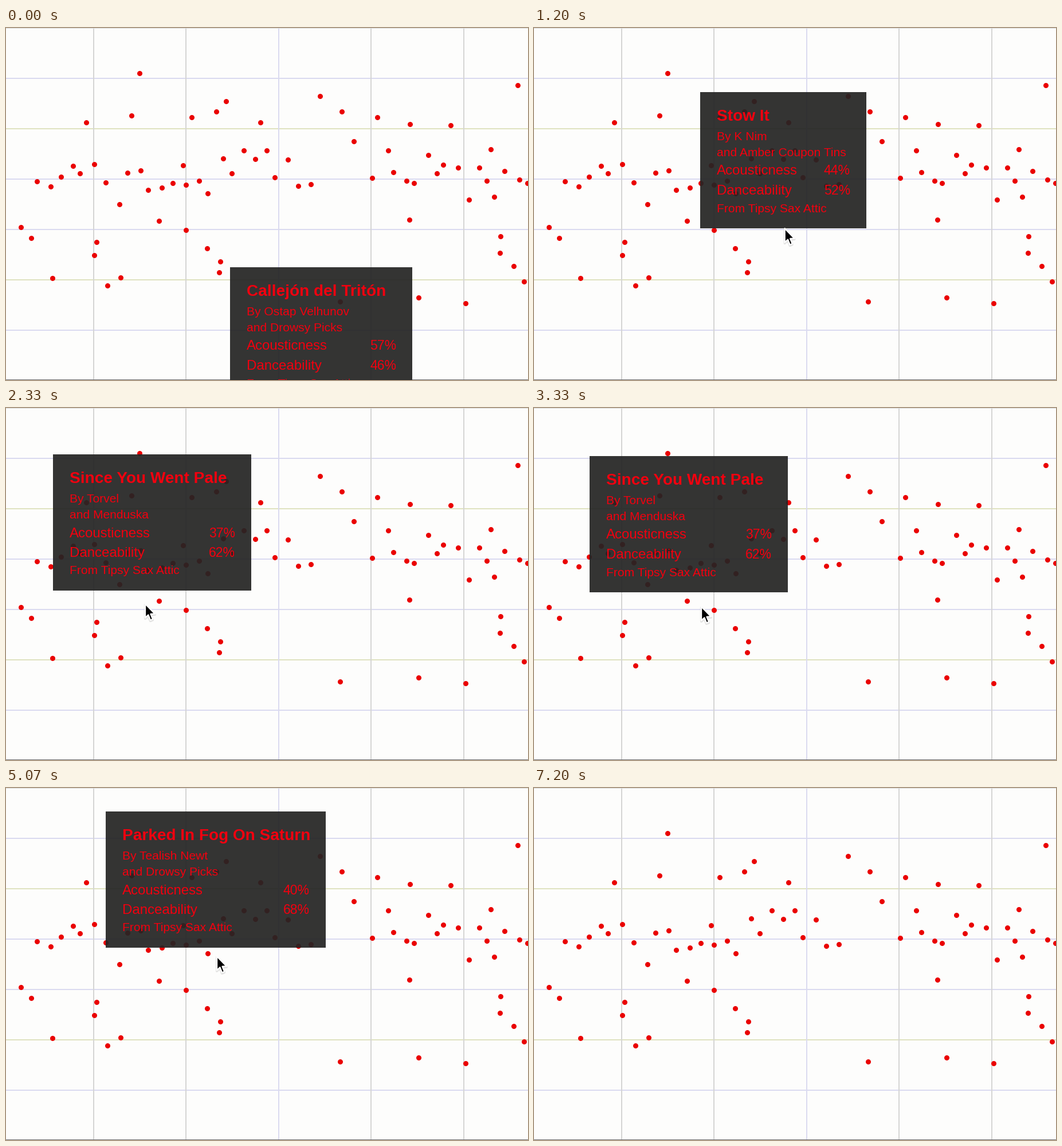
Recreate the animation shown at these times as a matplotlib script. Size 911x615 px, loop 7.59 s.

```python
import numpy as np
import matplotlib.pyplot as plt
from matplotlib.animation import FuncAnimation
from matplotlib.patches import Polygon, Rectangle

W, H, DPI = 911, 615, 72
FRAMES, INTERVAL = 253, 30
STEP = 1000 / 15          # the pointer and card move at 15 steps a second
LAST = 108
FONT = "Liberation Sans"
RED, DOT = "#f2000f", "#ea0000"
CARD_H, GAP, FOLLOW = 238, 23, 0.3

# Tracks that stand apart; the others crowd the middle belt
OUTLIERS = [
    (233, 79), (140, 165), (219, 153), (324, 156), (367, 146), (384, 128),
    (444, 165), (548, 119), (586, 146), (648, 156), (705, 168), (776, 170),
    (893, 100), (607, 198), (846, 212), (704, 335), (26, 348), (44, 367),
    (158, 374), (154, 397), (81, 437), (177, 450), (200, 436), (267, 337),
    (314, 353), (314, 274), (351, 385), (374, 408), (372, 427), (583, 478),
    (720, 471), (802, 481), (863, 364), (862, 393), (886, 416), (904, 443),
]

# first step, card width, title, artist, second artist, acousticness, danceability
SONGS = [
    (0, 318, "Callejón del Tritón", "Ostap Velhunov", "Drowsy Picks", 57, 46),
    (7, 290, "Stow It", "K Nim", "Amber Coupon Tins", 44, 52),
    (26, 346, "Since You Went Pale", "Torvel", "Menduska", 37, 62),
    (53, 272, "Drumblezoo", "Drowsy Picks", "DuBraise", 40, 60),
    (72, 384, "Parked In Fog On Saturn", "Tealish Newt", "Drowsy Picks", 40, 68),
]
PLAYLIST = "Tipsy Sax Attic"

# step, x, y of the pointer tip
POINTER = [
    (0, 490, 739), (10, 428, 419), (20, 440, 333), (27, 270, 344),
    (42, 212, 340), (50, 292, 347), (53, 314, 353), (69, 314, 353),
    (73, 386, 294), (76, 368, 294), (90, 368, 294), (101, 440, 700),
    (105, 440, 700), (108, 440, 1150),
]
ARROW = np.array([(0, 0), (0, 24.5), (5.4, 19.4), (9, 28.6), (13.2, 26.8),
                  (9.6, 17.8), (17, 17.5)])


def belt():
    """Loose columns of tracks on either side of the gap in the middle."""
    rng = np.random.default_rng(7)
    x = np.r_[np.linspace(54, 533, 25), np.linspace(644, 909, 16)]
    y = np.clip(rng.normal(268, 30, x.size), 214, 330)
    return np.column_stack([x + rng.uniform(-6, 6, x.size), y])


def pointer_path():
    t, x, y = np.array(POINTER, float).T
    steps = np.arange(LAST + 1)
    return np.column_stack([np.interp(steps, t, x), np.interp(steps, t, y)])


def card_path(tips):
    """Top centre of the card, closing part of its distance at each step."""
    path = [np.array([550.0, 418.0])]
    for goal in tips[1:] - (0, GAP + CARD_H):
        path.append(path[-1] + FOLLOW * (goal - path[-1]))
    return np.array(path)


TIP = pointer_path()
CARD = card_path(TIP)

fig = plt.figure(figsize=(W / DPI, H / DPI), dpi=DPI, facecolor="#fdfdfc")
ax = fig.add_axes([0, 0, 1, 1])
ax.set_xlim(0, W)
ax.set_ylim(H, 0)
ax.axis("off")

GREY, LILAC, OLIVE = "#d5d5d4", "#dadaf0", "#dfe2c0"
for k in range(6):
    ax.axhline(87.6 + 88 * k, color=OLIVE if k in (1, 4) else LILAC, lw=2, zorder=1)
for k in range(5):
    ax.axvline(152.6 + 161.5 * k, color=LILAC if k == 2 else GREY, lw=2, zorder=1)
ax.axhspan(0, 1, color="#dcdcdc", lw=0, zorder=1)
ax.axhspan(H - 1, H, color="#6c6c70", lw=0, zorder=1)

ax.scatter(*np.vstack([OUTLIERS, belt()]).T, s=9 ** 2, c=DOT, linewidths=0, zorder=2)

card = ax.add_patch(Rectangle((0, 0), 1, CARD_H, fc="#242424", alpha=0.93, lw=0, zorder=3))


def label(size, weight="normal", ha="left"):
    return ax.text(0, 0, "", family=FONT, size=size, weight=weight, ha=ha,
                   va="baseline", color=RED, zorder=4)


BASELINES = (50, 84, 112, 144.5, 179, 209.5)
left_col = [label(28, "bold"), label(21), label(21), label(24), label(24), label(21)]
right_col = [label(23, ha="right"), label(23, ha="right")]

shadow = ax.add_patch(Polygon(ARROW, fc="black", ec="black", lw=4, alpha=0.1,
                              joinstyle="round", zorder=5))
arrow = ax.add_patch(Polygon(ARROW, fc="black", ec="white", lw=2.4,
                             joinstyle="round", zorder=6))


def draw(frame):
    n = min(int((frame * INTERVAL + 20) / STEP), LAST)
    song = [s for s in SONGS if s[0] <= n][-1]
    _, width, title, artist, partner, acoustic, dance = song

    left, top = np.floor(CARD[n] - (width / 2, 0))
    card.set_bounds(left, top, width, CARD_H)

    lines = (title, f"By {artist}", f"and {partner}", "Acousticness",
             "Danceability", f"From {PLAYLIST}")
    for text, line, dy in zip(left_col, lines, BASELINES):
        text.set_text(line)
        text.set_position((left + 29, top + dy))
    for text, value, dy in zip(right_col, (acoustic, dance), BASELINES[3:5]):
        text.set_text(f"{value}%")
        text.set_position((left + width - 28, top + dy))

    arrow.set_xy(ARROW + TIP[n])
    shadow.set_xy(ARROW + TIP[n] + (0, 1.5))
    return [card, *left_col, *right_col, shadow, arrow]


anim = FuncAnimation(fig, draw, frames=FRAMES, interval=INTERVAL,
                     repeat=True, repeat_delay=0, blit=False)
plt.show()
```
